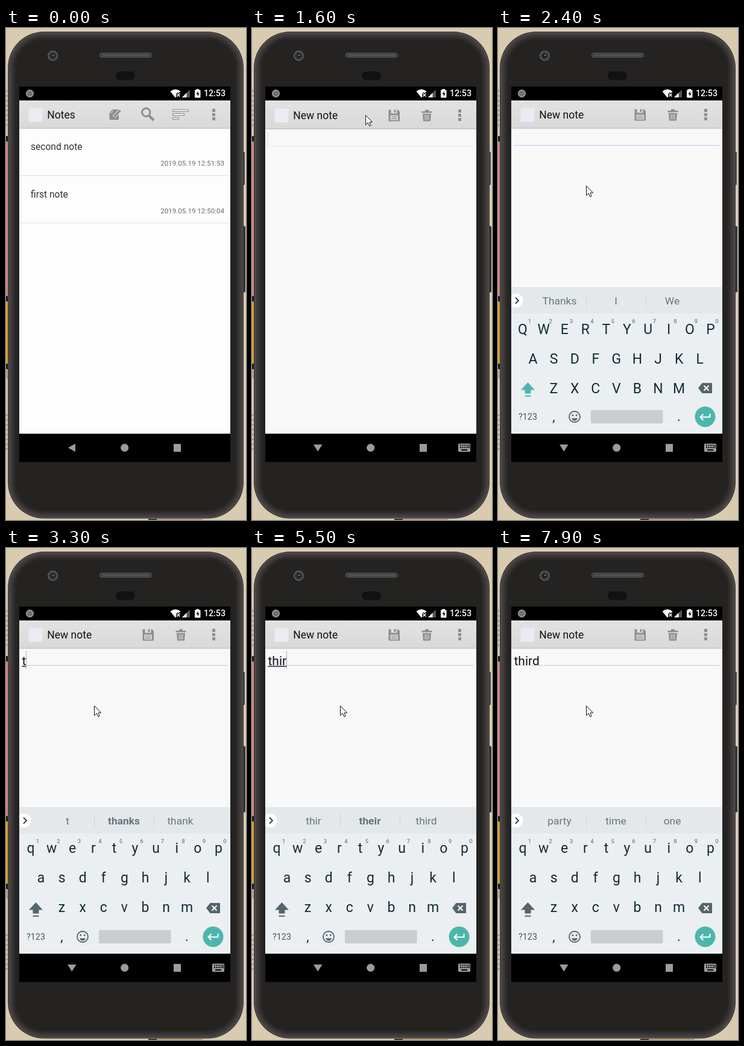
Recreate the animation shown at these times as an HTML page. Size 398 by 815 pixels, loop 8000 ms.

```html
<!DOCTYPE html>
<html lang="en">
<head>
<meta charset="utf-8">
<title>Note taking demo</title>
<style>
  html, body { margin: 0; width: 100%; height: 100%; overflow: hidden; background: #d9cbb0; }
  svg { display: block; width: 398px; height: 815px; font-family: Roboto, "Open Sans", sans-serif; }
  text { white-space: pre; }
  .mid { text-anchor: middle; }
  .end { text-anchor: end; }
</style>
</head>
<body>
<svg id="stage" viewBox="0 0 398 815" xmlns="http://www.w3.org/2000/svg"></svg>
<script>
const LOOP = 8000, STEP = 100;
const GREY = '#8e8e8e', INK = '#132b35', SLATE = '#56646b', TEAL = '#4db6ac';

const rect = (x, y, w, h, fill, more = '') =>
  `<rect x="${x}" y="${y}" width="${w}" height="${h}" fill="${fill}" ${more}/>`;
const circle = (x, y, r, fill, more = '') =>
  `<circle cx="${x}" cy="${y}" r="${r}" fill="${fill}" ${more}/>`;
const path = (d, fill, more = '') => `<path d="${d}" fill="${fill}" ${more}/>`;
const line = (d, stroke, width, more = '') =>
  path(d, 'none', `stroke="${stroke}" stroke-width="${width}" ${more}`);
const text = (s, x, y, size, fill, more = '') =>
  `<text x="${x}" y="${y}" font-size="${size}" fill="${fill}" ${more}>${s}</text>`;
const group = (id, body, more = '') => `<g id="${id}" ${more}>${body}</g>`;

const defs = `<defs>
  <linearGradient id="bar" x2="0" y2="1"><stop stop-color="#e2e2e2"/><stop offset="1" stop-color="#d9d9d9"/></linearGradient>
  <radialGradient id="ball"><stop stop-color="#6c6c6c"/><stop offset=".65" stop-color="#777"/><stop offset="1" stop-color="#b4b4b4"/></radialGradient>
  <clipPath id="content"><rect x="22" y="120" width="350" height="552"/></clipPath>
</defs>`;

function backdrop() {
  return rect(0, 0, 398, 815, '#d9cbb0') +
    rect(0, 179, 4, 9, '#241f1e') + rect(0, 188, 4, 257, '#d98880') +
    rect(0, 444, 4, 9, '#241f1e') + rect(0, 453, 4, 103, '#dfa02e') +
    rect(0, 556, 4, 9, '#241f1e') + rect(0, 565, 4, 16, '#b9a98d') +
    line('M1 103V165M1 640V700', '#8d8270', 1.5, 'stroke-dasharray="3 5"') +
    rect(250, 813, 76, 2, '#b59b72') + rect(236, 813, 14, 2, '#4a3324');
}

function phone() {
  const shell = (inset, fill) => rect(3 + inset, 6 + inset, 391 - 2 * inset,
    806.5 - 2 * inset, fill, `rx="${60 - inset}"`);
  // the rim fades from warm grey into the dark face
  const fade = Array.from({ length: 12 }, (_, i) => {
    const k = (1 - i / 11) ** 1.5;
    return shell(4 + i, `rgb(${36 + 34 * k},${35 + 30 * k},${34 + 30 * k})`);
  }).join('');
  return rect(391, 205, 5, 55, '#4a4646', 'rx="1.5"') + rect(391, 328, 6, 110, '#343131', 'rx="2"') +
    shell(0, '#393636') + shell(1.5, '#585454') + shell(3, '#3a3737') + fade +
    circle(77.5, 46, 7.5, '#2c2c2c', 'stroke="#5e5e5e" stroke-width="2"') +
    circle(77.5, 46, 4, '#161616', 'stroke="#4b4b4b"') + circle(78, 45.5, 1.4, '#777') +
    rect(155.5, 41.5, 86, 7, '#3c3c3c', 'rx="3.5" stroke="#5e5e5e"') +
    rect(159, 43.5, 79, 3, '#545454', 'rx="1.5"') +
    rect(182, 72, 32, 14, '#121112', 'rx="7"');
}

function statusBar() {
  return rect(22, 97, 350, 23, '#000') +
    circle(39.5, 108.5, 6.5, 'url(#ball)') +
    path('M272.5 105Q281 98 289.5 105L281 115.5Z', '#fff') +
    line('M283 108l6 6m0-6l-6 6', '#000', 4) + line('M283.5 108.5l5 5m0-5l-5 5', '#fff', 1.5) +
    path('M292 115L305 102V115Z', '#555') + path('M292 115L299.5 107.5V115Z', '#fff') +
    rect(313, 102.5, 9.5, 13, '#fff', 'rx="1"') + rect(315.7, 101, 4, 2, '#fff') +
    path('M318.5 104.5l-3 5h2.2v4l3-5.2h-2.2z', '#000') +
    text('12:53', 364, 113, 14.2, '#fff', 'class="end" font-weight="500"');
}

function appBar(title, icons) {
  const dots = [134, 141, 148].map(y => rect(342, y, 5, 5, GREY)).join('');
  return rect(22, 120, 350, 46, 'url(#bar)') + rect(22, 165.5, 350, 1.2, '#bcbcbc') +
    rect(37.5, 132.5, 23, 23, '#eceaf3', 'rx="2"') +
    text(title, 68.3, 150, 17.5, '#111') + icons + dots;
}

function listScreen() {
  const row = (i, title, date) => {
    const y = 166 + 78.5 * i;
    return text(title, 41, y + 36, 15.6, '#333') +
      text(date, 362, y + 62, 11.6, '#6b6b6b', 'class="end"') +
      rect(22, y + 78, 350, 1, '#e2e2e2');
  };
  const icons =
    circle(180.5, 143, 26, '#fff', 'id="ripple" opacity=".12" clip-path="url(#content)"') +
    path('M176.5 135H187V152H171.5V140Z', GREY) +
    line('M172 139.8H176.3V135.5', '#dedede', 1) +
    line('M178.5 147.5L190 136', '#dedede', 5.5) + line('M180 146L189.5 136.5', GREY, 3.4) +
    path('M178 148.2l.8-3.6 2.8 2.8z', GREY) +
    circle(232.3, 139.8, 6.7, 'none', `stroke="${GREY}" stroke-width="3"`) +
    line('M237 145L245 153', GREY, 4) +
    [27, 20, 11].map((w, i) => rect(276.5, 135 + 6.5 * i, w - 1, 3.5, '#e6e6e6',
      `stroke="${GREY}" stroke-width="1.2" rx="1"`)).join('');
  return rect(22, 120, 350, 552, '#fdfdfd') + appBar('Notes', icons) +
    row(0, 'second note', '2019.05.19 12:51:53') +
    row(1, 'first note', '2019.05.19 12:50:04') +
    group('added', row(2, '&lt;Untitled&gt;', '1558241608408'));
}

function editScreen() {
  const icons =
    path('M226.5 134.5h4v6h10v-6h1.5l3 3v16h-18.5z', GREY) +
    rect(235.5, 134.5, 3, 4.5, GREY) +
    rect(229.5, 143.5, 12.5, 8, '#dedede') +
    line('M231 145.8h9.5M231 149h9.5', GREY, 1.3) +
    rect(281.5, 137, 17, 2.5, GREY) + rect(287, 134.5, 6, 3, GREY) +
    path('M283 141h14l-1 12.5h-12z', GREY) +
    line('M287.3 143v8.5M290 143v8.5M292.7 143v8.5', '#dedede', 1.1);
  return rect(22, 120, 350, 552, '#f8f8f8') + appBar('New note', icons) +
    rect(26, 194, 341, 1, '#c6c6f4', 'id="rule"') +
    text('', 26.5, 194, 21, '#111', 'id="note"') +
    rect(26.5, 195.5, 0, 1.3, '#111', 'id="under"') +
    rect(26, 171, 1, 29, '#b4b4c2', 'id="caret"');
}

function letters(upper) {
  const rows = [['qwertyuiop', 41], ['asdfghjkl', 58], ['zxcvbnm', 92.5]];
  return rows.map(([keys, x], r) => [...keys].map((k, i) =>
    text(upper ? k.toUpperCase() : k, x + 34.6 * i, (upper ? 506.5 : 504.5) + 49.3 * r, 23, INK, 'class="mid"')
  ).join('')).join('');
}

function keyboard() {
  const hints = [...'1234567890'].map((d, i) =>
    text(d, 52.5 + 34.5 * i, 489, 9.6, '#75838a', 'class="mid" font-weight="500"')).join('');
  const words = [102, 195.5, 289].map((x, i) =>
    text('', x, 458.3, 17.4, '#66757c', `class="mid" id="word${i}"`)).join('');
  return rect(22, 430, 350, 242, '#ebeff2') + rect(22, 430, 350, 43, '#e4e8eb') +
    rect(22, 429.5, 350, 1, '#d8e4e3') +
    circle(30, 451.5, 11.5, '#fff', 'clip-path="url(#content)"') +
    line('M29 446.5l5 5-5 5', '#333', 1.8) +
    rect(146, 440, 1, 23, '#ccd3d7') + rect(245, 440, 1, 23, '#ccd3d7') +
    words + hints + group('caps', letters(true)) + group('small', letters(false)) +
    path('M49.5 587L61 599.5H54.5V605.5H44.5V599.5H38ZM44.5 608.8h10v2h-10z', TEAL, 'id="shift"') +
    path('M338.5 588H355V605H338.5L332 596.5Z', SLATE) +
    line('M341.5 592.5l8 8m0-8l-8 8', '#fff', 2) +
    text('?123', 49.5, 649, 14.3, '#44545c', 'class="mid"') +
    text(',', 92.5, 651, 22, INK, 'class="mid"') +
    circle(127, 644, 9, 'none', `stroke="${SLATE}" stroke-width="1.8"`) +
    circle(123.8, 641.5, 1.4, SLATE) + circle(130.2, 641.5, 1.4, SLATE) +
    path('M122 646.5h10q-1.5 4-5 4t-5-4z', SLATE) +
    rect(154, 633, 119.5, 22, '#c9cdd0', 'rx="2"') +
    text('.', 300, 651, 22, INK, 'class="mid"') +
    circle(343.5, 644, 17, TEAL) +
    line('M351.5 639v5.5H336M340.5 639.5l-5 5 5 5', '#fff', 2);
}

function navBar() {
  const c = '#9c9c9c';
  const keys = [0, 1, 2, 3].map(i =>
    rect(345 + 3.6 * i, 690.5, 2, 2, '#000') + rect(345 + 3.6 * i, 694, 2, 2, '#000')).join('');
  return rect(22, 672, 350, 47, '#000') +
    path('M103 695.3L115 688.5V702Z', c, 'id="back"') +
    circle(196.7, 695.3, 6.5, c) + rect(278, 689, 12, 13, c) +
    group('ime', path('M102 690H116.5L109.25 701.5Z', c) +
      rect(342, 688.5, 20, 13.5, c, 'rx="1.5"') + keys +
      rect(359, 690.5, 1.5, 5.5, '#000') + rect(347, 698, 10, 2, '#000'));
}

const pointer = path('M.5.5V16.5L4.2 12.9 6.8 18.5 9.2 17.5 6.8 12H11.7Z', '#fff',
  'stroke="#111" stroke-width="1" stroke-linejoin="round"');
const inside = body => `<g clip-path="url(#content)">${body}</g>`;

document.getElementById('stage').innerHTML = defs + backdrop() + phone() + statusBar() +
  inside(listScreen() + group('edit', editScreen()) + group('keys', keyboard())) +
  navBar() + group('mouse', pointer);

const el = id => document.getElementById(id);
const show = (id, on) => el(id).setAttribute('display', on ? 'inline' : 'none');
const set = (id, attrs) => { for (const k in attrs) el(id).setAttribute(k, attrs[k]); };
const latest = (list, t) => list.filter(e => e[0] <= t).pop();

// time, typed text, caret x
const typed = [[0, '', 26], [3300, 't', 33], [3400, 'th', 45], [4100, 'thi', 50],
  [5500, 'thir', 57], [6900, 'third', 69], [7400, 'third ', 74]];
// time, suggestions, index of the bold one
const offers = [[0, 'Thanks,I,We', -1], [3300, 't,thanks,thank', 1], [3400, 'th,the,thank', 1],
  [4200, 'thi,this,think', 1], [5500, 'thir,their,third', 1],
  [7000, 'third,third,third party', 1], [7500, 'party,time,one', -1]];
const blinks = [[2400, 2900], [3900, 4100], [4700, 5100], [5900, 6400], [7900, 8000]];
// time, opacity, vertical offset
const editIn = [[0, 0, 44], [1400, .45, 20], [1500, .9, 5], [1600, 1, 1], [1700, 1, 0]];
const keysIn = [[0, 0, 24], [1700, .6, 12], [1800, 1, 0]];

function slide(id, list, t) {
  const [, opacity, y] = latest(list, t);
  show(id, opacity > 0);
  set(id, { opacity, transform: `translate(0 ${y})` });
}

function mouseAt(t) {
  const ease = start => {
    const u = Math.min(1, Math.max(0, (t - start) / 300));
    return 1 - (1 - u) ** 2;
  };
  const a = ease(200), b = ease(1900);
  return [274 - 86 * a - 42 * b, 99 + 45 * a + 117 * b].map(Math.round);
}

function render(ms) {
  const t = Math.floor(ms / STEP) * STEP;
  show('mouse', t >= 200);
  set('mouse', { transform: `translate(${mouseAt(t)})` });
  show('ripple', t >= 1100 && t < 1300);
  show('added', t >= 1300);
  show('back', t < 1500);
  show('ime', t >= 1500);
  slide('edit', editIn, t);
  slide('keys', keysIn, t);
  set('rule', { fill: t < 1700 ? '#ededf1' : '#c6c6f4' });

  const [, word, x] = latest(typed, t);
  el('note').textContent = word;
  set('under', { width: word && t < 7400 ? x - 26 : 0 });
  const off = blinks.some(([from, to]) => t >= from && t < to);
  set('caret', { x, fill: off ? '#fff' : word ? '#a9a9b4' : '#dcdcea' });

  const [, list, bold] = latest(offers, t);
  list.split(',').forEach((s, i) => {
    el('word' + i).textContent = s;
    set('word' + i, { 'font-weight': i === bold ? 700 : 400 });
  });
  const upper = t < 3300;
  show('caps', upper);
  show('small', !upper);
  set('shift', { fill: upper ? TEAL : SLATE });
}

const start = performance.now();
function tick() {
  render((performance.now() - start) % LOOP);
  requestAnimationFrame(tick);
}
tick();
</script>
</body>
</html>
```
